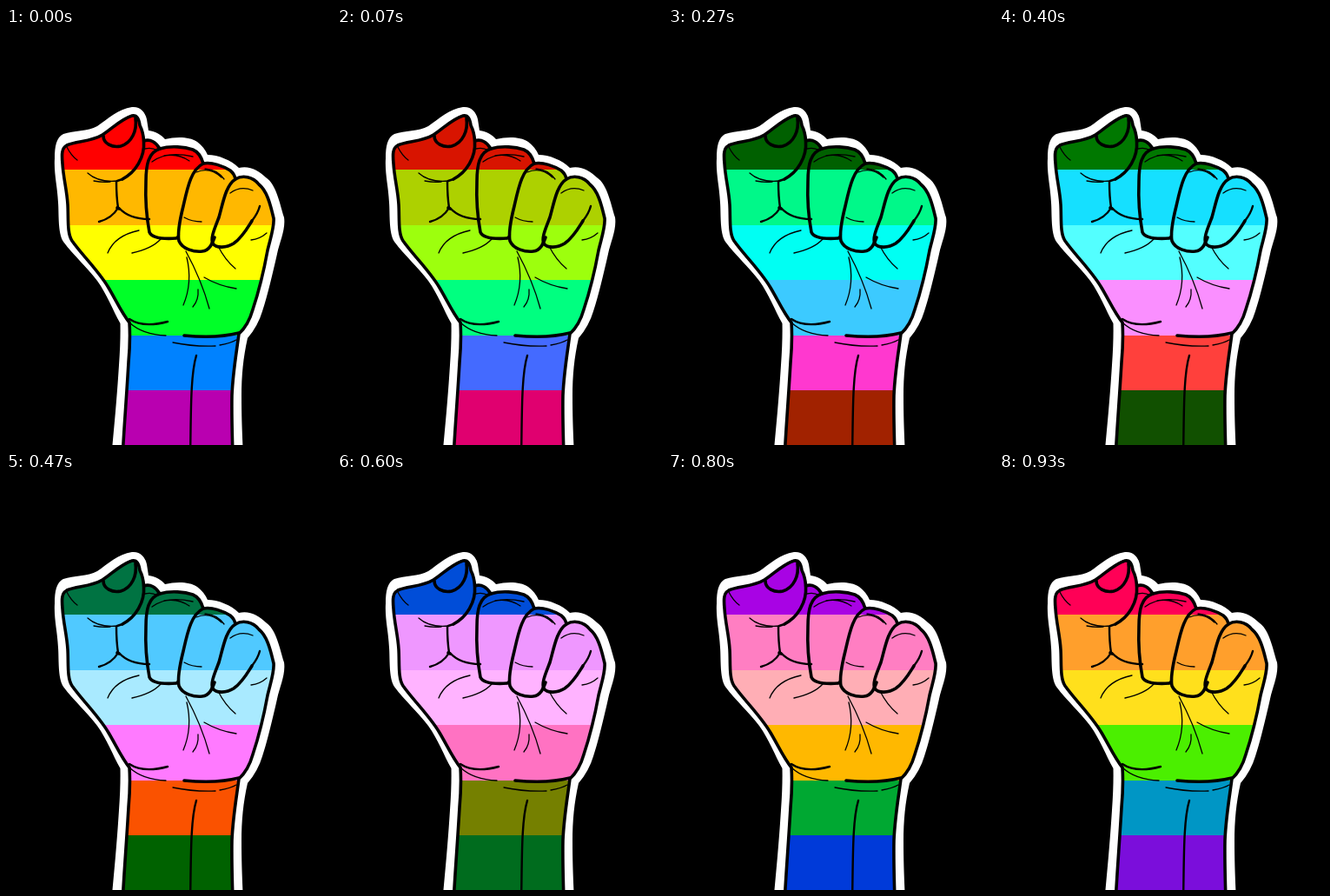
Write an HTML page that moves like this. It is 374x480 px and loops after 0.99 s.

```html
<!DOCTYPE html>
<html lang="en">
<head>
<meta charset="utf-8">
<title>Rainbow fist</title>
<style>
html, body { margin: 0; width: 100%; height: 100%; overflow: hidden; background: #000; }
svg { display: block; width: 374px; height: 480px; }
.ink path { fill: none; stroke: #000; stroke-linecap: round; stroke-linejoin: round; }
.bold path { stroke-width: 3.6; }
.mid path { stroke-width: 2.4; }
.thin path { stroke-width: 1.3; }
</style>
</head>
<body>
<svg viewBox="0 0 374 480">
  <defs>
    <path id="hand" d="M134 495 C136 458 139 420 141 385 C142.500 368 143 354 142 339
      C133 328 127 314 118 299 C107 280 88 262 76 245 C70 236 72 218 71 203
      C70 186 66 173 65 156 C64 145 64 138 70 135 C81 130 98 131 111 123
      C122 116 132 105 145 101 C151 100 153 105 154 112 Q158 120 158.500 130
      C166 127 173 132 177 139 C190 135 206 137 215 140 C222 143 225 149 227 156
      C237 154 250 159 258 164 Q263 168 264 174 C272 169 284 171 291 180
      C300 187 304 202 308 219 C309 229 304 243 301 256 C297 278 290 306 284 324
      Q279 342 268 352 C265 375 261 397 260 423 C259.500 450 260.500 470 261 495 Z"/>
    <clipPath id="clip"><use href="#hand"/></clipPath>
  </defs>
  <path fill="#fff" d="M121 495 C125 455 128 420 130 388 Q132 360 131.500 340
    C123 325 116 306 105 291 C94 276 78 262 66 246 C59.500 236 61 214 60 201
    C59 181 55 168 56 150 C56 136 58 126 66 122 C78 118 94 119 105 113
    C117 105 129 93 145 91 C154 90 160 96 162 105 L164 118
    C172 119 179 123 183 128 C196 125 211 125 220 131 Q228 137 232 146
    C244 146 259 152 268 161 C280 158 291 164 299 172 C311 180 315 202 320 218
    C322 232 315 246 312 260 C307 282 301 308 295 326 Q290 343 278 357
    C273 379 271 400 271 424 C271 450 272 470 273 495 Z"/>
  <g id="bands" clip-path="url(#clip)"></g>
  <g class="ink bold">
    <use href="#hand" fill="none" stroke="#000" stroke-width="3.600" stroke-linejoin="round"/>
    <path d="M112 124 C112 133 122 138 132 136 C145 132 151 118 149 104"/>
    <path d="M158.500 130 C160 149 149 166 134 174"/>
    <path d="M177 139 C164 143 161 157 161 177 C160 201 162 219 165 235 C168 242 182 243 196 242"/>
    <path d="M227 156 C213 163 209 183 204 205 C200 221 197 235 199 245 C203 255 217 258 226 257 C234 256 237 249 240 241"/>
    <path d="M264 174 C253 181 250 200 245 218 C240 231 235 242 238 248 C242 254 254 253 262 248 C272 241 278 230 283 222"/>
    <path d="M205 354 C227 356 249 356 268 351"/>
    <path d="M128 207 L130 208"/>
  </g>
  <g class="ink mid">
    <path d="M134 174 L128 176"/>
    <path d="M127 177 Q127 194 129 207 Q122 219 107 223"/>
    <path d="M130 207 C138 216 151 220 165 220"/>
    <path d="M283 222 Q290 213 292 205"/>
    <path d="M142 335 C154 343 171 342 186 338"/>
    <path d="M219 377 C212 400 213 445 212 495"/>
    <path d="M196 242 L199 238"/>
  </g>
  <g class="ink thin">
    <path d="M70 137 Q75 147 82 152"/>
    <path d="M94 167 Q106 178 128 176 M101 176 Q111 178 120 177"/>
    <path d="M160 139 Q168 137 174 141"/>
    <path d="M168 154 Q185 141 215 148 M182 147 Q198 144 211 153"/>
    <path d="M205 218 Q214 223 225 223"/>
    <path d="M219 166 Q234 159 248 172 M229 162 Q243 163 251 174"/>
    <path d="M258 190 Q270 181 284 187"/>
    <path d="M282 244 Q292 243 300 236"/>
    <path d="M153 233 Q125 239 117 259"/>
    <path d="M178 243 Q168 254 145 259"/>
    <path d="M208 264 Q215 293 204 319"/>
    <path d="M207 257 Q225 290 234 323"/>
    <path d="M228 287 Q245 297 265 300"/>
    <path d="M221 301 Q222 313 215 321"/>
    <path d="M244 251 Q252 267 264 277"/>
    <path d="M192 362 Q216 367 241 366 M246 365 Q258 363 265 359"/>
    <path d="M142 339 Q157 353 184 354"/>
  </g>
</svg>
<script>
const LOOP = 990, STEPS = 15;
const LUMA = [0.213, 0.715, 0.072];
const SWING = [[-0.213, -0.715, 0.928], [0.143, 0.14, -0.283], [-0.787, 0.715, 0.072]];
const edges = [90, 163, 227, 290, 354, 417, 490];
const colors = [[255, 0, 0], [255, 184, 0], [255, 255, 0], [0, 255, 40], [0, 130, 255], [185, 0, 176]];

const group = document.getElementById("bands");
const bands = colors.map((_, i) => {
  const rect = document.createElementNS("http://www.w3.org/2000/svg", "rect");
  const box = { x: 50, y: edges[i], width: 280, height: edges[i + 1] - edges[i] };
  for (const key in box) rect.setAttribute(key, box[key]);
  return group.appendChild(rect);
});

// Luminance-preserving hue rotation
function rotateHue(rgb, angle) {
  const c = Math.cos(angle), s = Math.sin(angle);
  return SWING.map((row, i) => {
    const v = rgb.reduce((sum, ch, j) =>
      sum + ch * (LUMA[j] + ((i === j) - LUMA[j]) * c + row[j] * s), 0);
    return Math.round(Math.min(255, Math.max(0, v)));
  });
}

// Steps begin on multiples of 10 ms
const stepStart = i => Math.round(i * 20 / 3) * 10;

function draw(time) {
  const t = time % LOOP;
  let step = STEPS - 1;
  while (step > 0 && stepStart(step) > t) step--;
  const angle = step / STEPS * 2 * Math.PI;
  bands.forEach((band, i) => band.setAttribute("fill", `rgb(${rotateHue(colors[i], angle)})`));
}

let start;
function tick(now) {
  start ??= now;
  draw(Math.max(0, now - start));
  requestAnimationFrame(tick);
}
draw(0);
requestAnimationFrame(tick);
</script>
</body>
</html>
```
